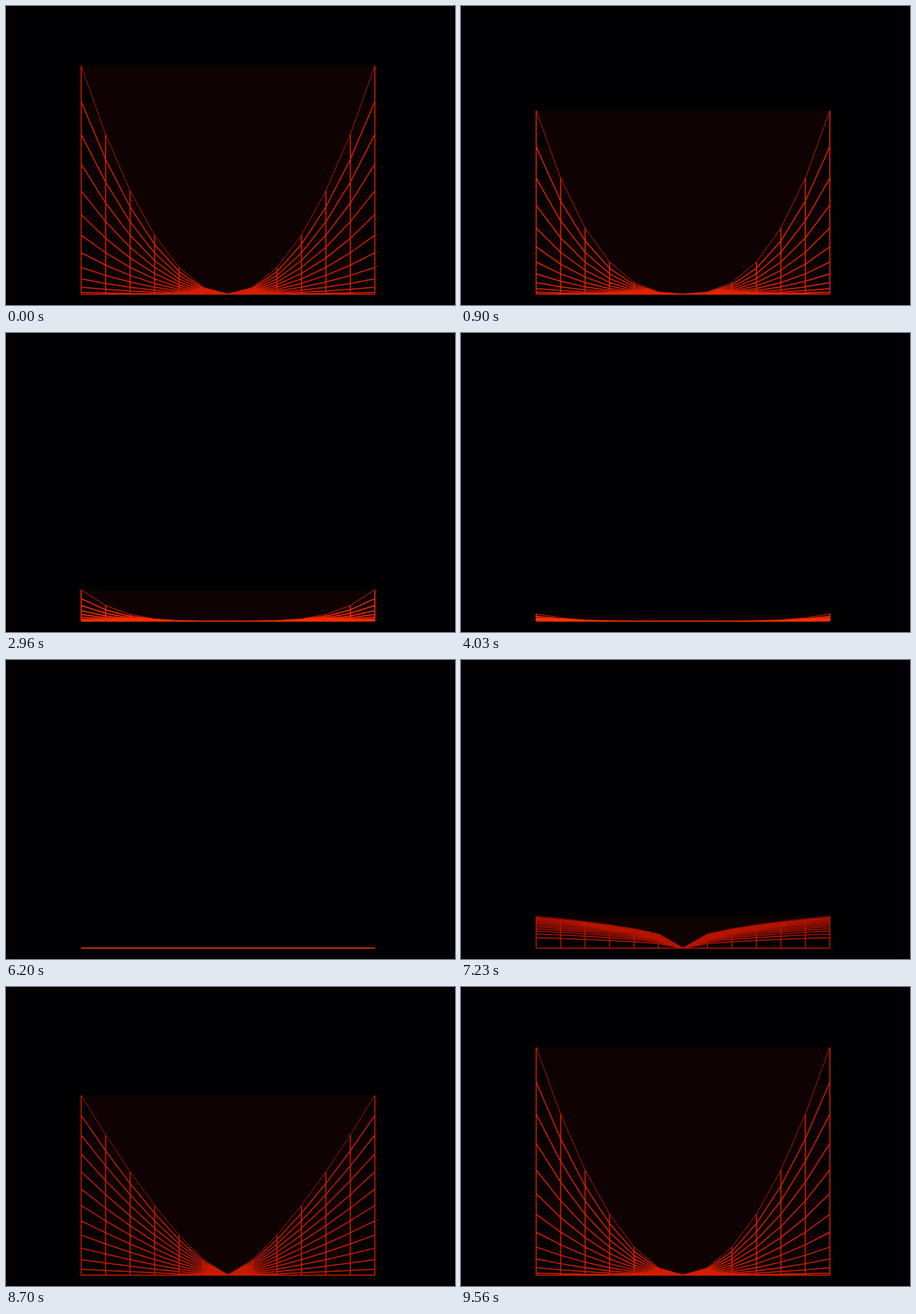
These frames come from a looping animation (600x400 px, 9600 ms). An HTML page with a canvas:

```html
<!DOCTYPE html>
<html lang="en">
<head>
<meta charset="utf-8">
<title>Power curves</title>
<style>
  html, body { margin: 0; width: 100%; height: 100%; overflow: hidden; background: #010103; }
  canvas { display: block; }
</style>
</head>
<body>
<canvas id="stage" width="600" height="400"></canvas>
<script>
const ctx = document.getElementById('stage').getContext('2d');
const LOOP = 9600, RESET = 6512, RATE = 0.625 / 1000;
const LEFT = 100.45, STEP = 32.7, BASE = 385.45, CELLS = 12;

// Exponent -> height of the outer edge, eased between as square roots.
const KEYS = [[0, 0], [0.655, 83], [0.8425, 122], [1.28, 223], [1.952, 305.2],
  [2.5145, 245.5], [3.302, 103], [3.8, 42], [4.427, 10.6], [5.05, 2.2], [6.03, 0]]
  .map(([p, h]) => [p, Math.sqrt(h)]);

const secant = i => (KEYS[i + 1][1] - KEYS[i][1]) / (KEYS[i + 1][0] - KEYS[i][0]);

function slope(i) {
  if (i === 0) return 14.1;
  if (i === KEYS.length - 1) return secant(i - 1);
  const before = KEYS[i][0] - KEYS[i - 1][0];
  const after = KEYS[i + 1][0] - KEYS[i][0];
  return (secant(i - 1) * after + secant(i) * before) / (before + after);
}

function edgeHeight(p) {
  let i = 0;
  while (i < KEYS.length - 2 && p > KEYS[i + 1][0]) i++;
  const [p0, a] = KEYS[i], [p1, b] = KEYS[i + 1];
  const w = p1 - p0, s = Math.min(1, (p - p0) / w), r = 1 - s;
  const root = a * (1 + 2 * s) * r * r + b * (3 - 2 * s) * s * s
    + w * s * r * (slope(i) * r - slope(i + 1) * s);
  return Math.max(0, root) ** 2;
}

// The exponent climbs from 0 to about 6, then starts over.
const exponent = t => t < RESET ? 1.952 + t * RATE : (t - RESET) * RATE;

function draw(t) {
  const p = exponent(t), height = edgeHeight(p);
  const x = i => LEFT + i * STEP;
  const y = (i, j) => BASE - height * (Math.abs(i - 6) / 6 * j / CELLS) ** p;

  function curve(j) {
    const path = new Path2D();
    for (let i = 0; i <= CELLS; i++) path.lineTo(x(i), y(i, j));
    return path;
  }

  ctx.globalAlpha = 1;
  ctx.fillStyle = '#010103';
  ctx.fillRect(0, 0, 600, 400);

  // Each curve is filled up to its chord; the mesh is stroked once as a whole.
  ctx.fillStyle = '#0e0203';
  const mesh = new Path2D();
  for (let j = 0; j <= CELLS; j++) {
    const line = curve(j);
    ctx.fill(line);
    if (j < CELLS) mesh.addPath(line);
  }
  for (let i = 0; i <= CELLS; i++) {
    mesh.moveTo(x(i), BASE);
    mesh.lineTo(x(i), y(i, CELLS));
  }

  ctx.strokeStyle = `rgb(${Math.min(255, 170 + 22 * p)}, ${16 + 7 * p}, 0)`;
  ctx.lineJoin = 'bevel';
  ctx.lineWidth = 1.45;
  ctx.stroke(mesh);
  ctx.globalAlpha = 0.8;
  ctx.lineWidth = 1;
  ctx.stroke(curve(CELLS));
}

const start = performance.now();
function tick() {
  draw((performance.now() - start) % LOOP);
  requestAnimationFrame(tick);
}
tick();
</script>
</body>
</html>
```
